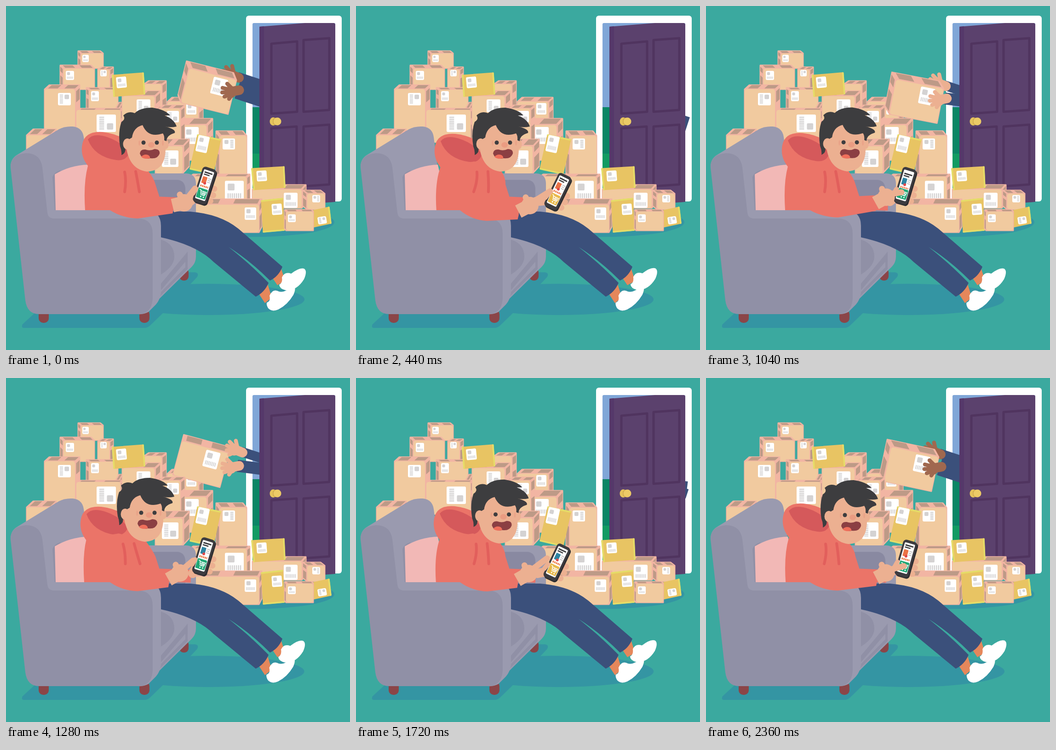
An HTML page for the animation above (2400 ms loop, 748x748 px).

```html
<!DOCTYPE html>
<html lang="en">
<head>
<meta charset="utf-8">
<title>Parcels</title>
<style>
html, body { margin: 0; width: 100%; height: 100%; overflow: hidden; background: #3ba99f; }
svg { display: block; width: 100vw; height: 100vh; }
</style>
</head>
<body>
<svg id="stage" viewBox="0 0 748 748" xmlns="http://www.w3.org/2000/svg"></svg>
<script>
const C = {
  front: '#f1ca9f', edge: '#f2b5a3', flap: '#bd9a87', grey: '#d4d2d2',
  env: '#e8c463', envEdge: '#e5dd68', door: '#5b416d', panel: '#50345f',
  sofa: '#9090a6', sofaLight: '#9a9aaf', sofaDeep: '#8989a1', wood: '#8b4548',
  shade: '#3495a3', jeans: '#3b507b', red: '#eb7468', redDeep: '#d5595b', cord: '#e25f5c',
  skin: '#ecb091', hair: '#3d3d3f', ankle: '#e5875b', pink: '#f2b8b6'
};

// ---------- drawing helpers ----------
const num = v => Math.round(v * 100) / 100;
const path = (d, fill, more = '') => `<path d="${d}" fill="${fill}" ${more}/>`;
const rect = (x, y, w, h, r, fill, more = '') =>
  `<rect x="${num(x)}" y="${num(y)}" width="${num(w)}" height="${num(h)}" rx="${r}" fill="${fill}" ${more}/>`;
const oval = (x, y, rx, ry, fill, more = '') =>
  `<ellipse cx="${x}" cy="${y}" rx="${rx}" ry="${ry}" fill="${fill}" ${more}/>`;
const line = (d, color, w, more = '') =>
  `<path d="${d}" fill="none" stroke="${color}" stroke-width="${w}" ${more}/>`;
const poly = pts => 'M' + pts.map(p => num(p[0]) + ',' + num(p[1])).join('L') + 'Z';
const round = 'stroke-linecap="round" stroke-linejoin="round"';

// kind 0: bars below, 1: bars left and square low, 2: bars left and square high, 3: bars right
function label(x, y, w, h, kind = 0) {
  const q = Math.min(w, h) * 0.36;
  const sx = kind === 1 || kind === 2 ? x + w * 0.86 - q : x + w * 0.15;
  const sy = kind === 1 ? y + h * 0.86 - q : y + h * 0.14;
  let d = '';
  for (let i = 0; i < 7; i++) {
    if (kind === 0) d += `M${num(x + w * (0.17 + i * 0.11))},${num(y + h * 0.62)}v${num(h * 0.24)}`;
    else d += `M${num(x + w * (kind === 3 ? 0.62 : 0.14))},${num(y + h * (0.16 + i * 0.11))}h${num(w * 0.25)}`;
  }
  return rect(x, y, w, h, 3, '#fff') + rect(sx, sy, q, q, 2, C.grey) + line(d, C.grey, num(w * 0.06));
}

// Front face at x, y; s is the signed side depth, d the lid depth.
function box(x, y, w, h, s, d, lab = '') {
  const top = (a, b) => [x + w * a + s * b, y - d * b];
  const sx = s > 0 ? x + w : x;
  const side = (c, b) => [sx + s * b, y + h * c - d * b];
  const hull = s > 0
    ? [[x, y], top(0, 1), top(1, 1), side(1, 1), [x + w, y + h], [x, y + h]]
    : [[x + w, y], top(1, 1), top(0, 1), side(1, 1), [x, y + h], [x + w, y + h]];
  const lid = (a, b) => poly([top(a, 0.2), top(b, 0.2), top(b, 1), top(a, 1)]);
  const flap = (a, b) => poly([side(a, 0.25), side(b, 0.25), side(b, 1), side(a, 1)]);
  let out = path(poly(hull), C.edge, `stroke="${C.edge}" stroke-width="3" stroke-linejoin="round"`);
  out += path(lid(0.08, 0.4) + lid(0.62, 0.97), C.flap);
  if (Math.abs(s) > 2) out += path(flap(0.06, 0.28) + flap(0.48, 0.97), C.flap);
  return out + rect(x, y, w, h, 5, C.front) + lab;
}

function envelope(pts, lab) {
  return path(poly(pts), C.env, `stroke="${C.env}" stroke-width="3" stroke-linejoin="round"`) + lab;
}
const strip = d => line(d, C.envEdge, 3.5, round);
const turn = (a, x, y, body) => `<g transform="rotate(${a} ${x} ${y})">${body}</g>`;

// ---------- scene ----------
const REST = [331, 259];
const parcelArt = s => box(0, 0, 105, 76, s, 14, label(56, 4, 32, 37));

function doorway() {
  return rect(522, 21, 208, 404, 6, '#fff') + rect(536, 37, 180, 388, 3, '#80a6d7') +
    rect(536, 220, 40, 101, 0, '#0a8665') + rect(536, 321, 40, 104, 0, '#129b62');
}
function door() {
  const panels = 'M577,82L633,77V230L577,234ZM647,74L703,70V226L647,230Z' +
    'M577,266L632,262V394L577,398ZM647,262L703,258V388L647,392Z';
  return path('M551,45L650,37H712Q716,37 716,41V426L551,438Z', C.door) +
    path('M551,45L561,44V437L551,438Z', '#55386a') +
    line(panels, C.panel, 5, 'stroke-linejoin="round"') +
    oval(581, 251, 7.5, 9, '#e6c35d') + oval(585, 251, 5, 8, '#cfa94c') + oval(590, 251, 8.5, 8.5, '#ecca66');
}

function backPile() {
  return box(163, 103, 48, 32, -6, 5, label(166, 106, 14, 16)) +
    box(125, 136, 67, 45, -7, 7, label(130, 141, 18, 20)) +
    box(200, 138, 25, 43, 8, 5, label(205, 139, 14, 14, 2)) +
    box(181, 182, 62, 46, -6, 4, label(185, 185, 17, 22)) +
    box(84, 181, 66, 110, 10, 9, label(113, 189, 28, 27, 2)) +
    box(45, 281, 50, 50, 14, 13) +
    box(238, 224, 14, 50, 8, 14) +
    box(153, 226, 96, 70, 4, 3, label(197, 236, 42, 38, 1)) +
    box(300, 170, 38, 75, 10, 7) +
    box(253, 196, 70, 70, 12, 11, label(284, 203, 30, 28, 1)) +
    box(351, 208, 67, 55, 10, 9, label(392, 211, 22, 25));
}
function frontPile() {
  return box(333, 223, 46, 85, 9, 7, label(350, 228, 26, 25, 1)) +
    box(325, 305, 59, 59, 14, 15, label(339, 314, 36, 36, 1)) +
    box(465, 282, 58, 92, -8, 10, label(471, 288, 27, 24, 3)) +
    `<g id="envLow">` + envelope([[417, 281], [466, 291], [450, 364], [401, 353]],
      strip('M417,281L466,291M401,354L450,365') + turn(12, 427, 300, label(415, 282, 25, 36))) + '</g>' +
    box(400, 371, 123, 64, 7, 5, label(476, 380, 41, 44)) +
    box(536, 399, 107, 40, 9, 10, label(604, 406, 30, 33)) +
    envelope([[535, 354], [604, 350], [606, 394], [539, 399]],
      strip('M535,354L539,399M604,350L606,394') + turn(-4, 556, 369, label(545, 358, 22, 23))) +
    box(400, 432, 150, 60, 6, 12, label(519, 438, 25, 27)) +
    box(655, 408, 38, 34, -9, 7, label(666, 411, 17, 16, 3)) +
    envelope([[669, 445], [702, 438], [706, 472], [669, 480]],
      strip('M702,438L706,472') + turn(-9, 687, 466, label(678, 458, 19, 16, 2))) +
    envelope([[556, 424], [601, 419], [605, 487], [560, 491]],
      strip('M556,424L601,419M560,491L605,487') + turn(-4, 589, 442, label(578, 430, 22, 24))) +
    box(609, 447, 59, 41, -3, 4, label(613, 453, 17, 17));
}

function farSofa() {
  return path('M40,700H300Q308,700 313,695L340,669L415,590Q422,579 408,579H120L62,668L36,692Q32,700 40,700Z', C.shade) +
    oval(440, 638, 209, 34, C.shade, 'id="manShade"') +
    rect(377, 570, 20, 27, 9, C.wood) + rect(71, 660, 22, 29, 10, C.wood) + rect(290, 660, 22, 29, 10, C.wood) +
    path('M290,364H393Q413,366 413,386V545Q413,558 404,567L328,642H290Z', C.sofaLight) +
    path('M300,378H374Q388,380 390,396V450H300Z', C.sofaDeep) +
    path('M330,506Q366,514 366,545Q366,568 330,588Z', C.sofa) +
    path('M330,612L395,534V572L330,636Z', C.sofa) + path('M337,618L390,556V568L337,622Z', C.sofaLight) +
    path('M10,352Q9,334 22,325L115,268Q128,261 145,262Q166,264 169,285L190,450H60Z', C.sofaLight) +
    path('M101,372Q104,362 118,357V446H106Z', C.sofa) +
    path('M106,366Q140,346 178,345L200,446H108Z', C.pink);
}
function nearSofa() {
  return path('M78,352L106,444H304Q337,446 337,478V625Q334,640 326,649L310,665Q300,671 288,670H110Z', C.sofaLight) +
    path('M10,352Q9,322 44,320Q74,320 79,350L90,450Q92,462 104,462H288Q319,463 319,496V636Q317,669 288,670H72Q46,670 42,640Z', C.sofa);
}
function legs() {
  return path('M598,570L607,598L590,607L580,592Z', C.ankle) + path('M569,605L578,634L563,646L550,626Z', C.ankle) +
    path('M600,590Q606,577 620,582Q638,568 648,571Q656,576 648,594Q632,620 608,618Q595,615 594,606Q602,602 600,590Z', '#fff', 'id="shoeFar"') +
    path('M573,630Q580,613 594,621Q606,624 625,608Q632,612 625,628Q612,650 592,660Q578,666 570,657Q566,650 567,645Q576,642 573,630Z', '#fff', 'id="shoeNear"') +
    path('M320,447H400Q465,452 505,484L601,567Q593,588 574,597Q530,553 484,524Q530,560 571,602Q562,623 543,632L452,557Q415,520 337,503L320,500Z', C.jeans);
}

function head() {
  return oval(348, 301, 5.5, 10, C.skin) +
    path('M260,290Q262,354 306,360Q346,359 347,312V262Q300,235 262,272Z', C.skin) +
    oval(290, 298, 2, 6, '#eaa489') + oval(341, 298, 2, 6, '#eaa489') +
    oval(316, 302, 7, 6, '#ea9c82') + oval(299, 297, 4.5, 4.5, C.hair) + oval(328, 297, 4.5, 4.5, C.hair) +
    path('M291,321Q292,311 303,312Q313,316 323,311Q335,311 334,321Q330,333 314,331Q296,335 291,321Z', '#8b3f43') +
    path('M294,328Q300,321 309,324Q314,327 313,331Q300,334 294,328Z', '#ef6f5b') +
    path('M251,324Q252,314 248,305Q243,275 251,252Q261,246 255,238Q266,227 280,233Q292,221 318,221Q346,225 357,238L345,238' +
      'Q366,246 371,262Q358,265 346,262Q370,268 367,276Q349,281 349,294L344,292Q345,282 341,277Q309,288 297,259Q277,264 274,286Q261,292 259,306Q262,320 251,324Z', C.hair) +
    oval(264, 300, 9.5, 12, C.skin);
}

function screenPage(color, spot) {
  return rect(-9, -30, 18, 3, 1, C.hair) + rect(-9, -25, 13, 2.5, 1, C.hair) +
    rect(-9, -19, 10, 15, 1.5, color) + oval(-1, -5, 3, 3, spot) +
    line('M3,-17h7M3,-13h6M3,-9h7', '#bbb', 1.6) +
    line('M-9,2h18', '#ef8354', 4, 'stroke-dasharray="3 1"');
}
function phone() {
  return rect(-14, -38, 31, 80, 7, '#2e2d30') + rect(-17, -40, 31, 80, 7, '#3d3c40') +
    rect(-13, -34, 23, 66, 2, '#fff') +
    `<g clip-path="url(#glass)"><g transform="translate(-1.5 0)"><g id="pageA">${screenPage('#ec7346', '#e0484a')}</g>` +
    `<g id="pageB">${screenPage('#2f85a2', '#e0484a')}</g></g></g>` +
    rect(-12, 7, 21, 22, 2, '#22a876', 'id="buy"') +
    line('M-9,11h3l3,10h8l2,-8h-12M-4,17h10M0,13v8M3,13v8', '#fff', 1.5) +
    oval(-2, 25, 1.5, 1.5, '#fff') + oval(4, 25, 1.5, 1.5, '#fff');
}
function man() {
  return path('', C.red, 'id="hood"') + path('', C.redDeep, 'id="hoodIn"') +
    line('', C.red, 28, 'id="farSleeve"') + path('', C.red, 'id="torso"') +
    line('', C.cord, 6, 'id="cords" ' + round) + `<g id="head">${head()}</g>` +
    line('', C.skin, 20, 'id="farPalm" ' + round) +
    `<g id="phone">${line('M0,2L21,0M2,14L23,14M2,28L21,28', C.skin, 13, round)}${phone()}` +
    `${line('M-20,24L-17,12', C.skin, 10, round)}</g>` +
    path('', C.red, 'id="sleeve"') + line('', C.skin, 30, 'id="wrist"') +
    `<circle id="palm" r="19" fill="${C.skin}"/>` + line('', C.skin, 13, 'id="fingers" ' + round);
}

const handArt = line('M4,0L-12,3', 'currentColor', 21, round) + oval(-14, 4, 12, 13, 'currentColor') +
  line('M-12,0L-32,-5M-12,4L-33,5M-12,8L-28,14M-12,10L-18,19M-10,-2L-22,-14', 'currentColor', 8.5, round);
const arm = id => `<g id="${id}">${line('', C.jeans, 26, `id="${id}Sleeve"`)}<g id="${id}Hand">${handArt}</g></g>`;

document.getElementById('stage').innerHTML =
  '<defs><clipPath id="glass"><rect x="-13" y="-34" width="23" height="40"/></clipPath></defs>' +
  rect(0, 0, 748, 748, 0, '#3ba99f') + oval(540, 470, 174, 32, C.shade) + doorway() + backPile() +
  `<g transform="translate(${REST})">${parcelArt(13)}</g>` +
  `<g id="mover">${arm('far')}<g id="parcel"></g>${arm('near')}</g>` + door() +
  '<g id="envTop">' + envelope([[232, 151], [298, 146], [301, 191], [235, 196]],
    strip('M232,151L235,196M298,146L301,191') + turn(-5, 251, 166, label(240, 154, 22, 24))) + '</g>' +
  frontPile() + farSofa() + legs() + nearSofa() + man();

// ---------- motion ----------
const LOOP = 2400, BEAT = 1200, STEP = 40;
// rows: [time, ...values]
const KEYS = {
  head: [[0, 0, 0], [80, -5, -4], [280, 0, -7], [440, 7, 0], [760, -6, -4], [1160, 3, 1]],
  hood: [[0, 0, 0], [80, -3, 6], [280, 0, 10], [440, 6, 4], [760, -4, 9], [1160, 2, -1]],
  phone: [[0, 433, 391, 18], [80, 431, 388, 17], [280, 435, 396, 19], [440, 440, 404, 26], [760, 429, 389, 20], [1160, 436, 393, 16]],
  wrist: [[0, 361, 434], [80, 352, 438], [280, 365, 438], [440, 352, 447], [760, 349, 409], [900, 362, 420], [1160, 369, 435]],
  palm: [[0, 387, 428], [80, 378, 424], [280, 390, 430], [440, 378, 434], [760, 373, 394], [900, 389, 406], [1160, 391, 424]],
  tip: [[0, 411, 397], [80, 407, 397], [280, 412, 398], [440, 422, 403], [760, 392, 354], [900, 429, 372], [1040, 425, 405], [1160, 430, 409]],
  shoe: [[0, 0], [80, -1], [280, -5], [440, -4], [760, -3], [1160, 0]],
  wob: [[0, 0], [440, 0], [760, 1], [1160, 0]]
};
// x, y, angle, side depth
const TOSS = [[640, 610, 330, -35, -12], [760, 492, 275, -27, -12], [880, 440, 195, -6, -12], [1000, 418, 164, 9, -12],
  [1120, 407, 157, 12, -12], [1160, 403, 150, 12, -12], [1200, 399, 136, 14, -10], [1280, 383, 137, 15, 0],
  [1400, 348, 164, 19, 6], [1480, 330, 204, 21, 10], [1560, ...REST, 0, 13]];
const NEAR = [[1160, 508, 193], [1200, 503, 183], [1280, 503, 191], [1400, 545, 208], [1500, 610, 224]];
const FAR = [[1160, 507, 164], [1200, 503, 154], [1280, 511, 160], [1400, 550, 190], [1500, 610, 216]];

// Cubic interpolation through the rows, wrapping when a period is given.
function sample(rows, t, period) {
  const n = rows.length;
  if (!period && t <= rows[0][0]) return rows[0].slice(1);
  if (!period && t >= rows[n - 1][0]) return rows[n - 1].slice(1);
  const at = i => {
    if (!period) return rows[Math.max(0, Math.min(n - 1, i))];
    const r = rows[(i + n) % n];
    return [r[0] + Math.floor(i / n) * period, ...r.slice(1)];
  };
  let i = 0;
  while (i < n - 1 && rows[i + 1][0] <= t) i++;
  const [a, b, c, d] = [at(i - 1), at(i), at(i + 1), at(i + 2)];
  const h = c[0] - b[0], u = (t - b[0]) / h;
  return b.slice(1).map((p, k) => {
    const j = k + 1;
    const m0 = (c[j] - a[j]) / (c[0] - a[0]) * h, m1 = (d[j] - b[j]) / (d[0] - b[0]) * h;
    const u2 = u * u, u3 = u2 * u;
    return (2 * u3 - 3 * u2 + 1) * p + (u3 - 2 * u2 + u) * m0 + (3 * u2 - 2 * u3) * c[j] + (u3 - u2) * m1;
  });
}

const el = id => document.getElementById(id);
const set = (id, name, v) => el(id).setAttribute(name, v);
const move = (id, x, y, a = 0) => set(id, 'transform', `translate(${num(x)} ${num(y)}) rotate(${num(a)})`);
const seg = (a, b) => `M${num(a[0])},${num(a[1])}L${num(b[0])},${num(b[1])}`;

function drawToss(t) {
  const shift = t - 600;
  const u = (shift + LOOP) % BEAT + 600;
  const pale = Math.floor(shift / BEAT) % 2 === 0;
  const [x, y, a, s] = sample(TOSS, u);
  const rad = a * Math.PI / 180, co = Math.cos(rad), si = Math.sin(rad);
  const onBox = (px, py) => [x + px * co - py * si, y + px * si + py * co];
  const near = u < 1160 ? onBox(112, 20) : sample(NEAR, u);
  const far = u < 1160 ? onBox(105, -8) : sample(FAR, u);
  el('parcel').innerHTML = u < 1600 ? parcelArt(s) : '';
  move('parcel', x, y, a);
  el('mover').style.color = pale ? C.skin : '#a0684f';
  el('mover').insertBefore(el('far'), u > 1220 ? el('near') : el('parcel'));
  move('nearHand', near[0], near[1]);
  move('farHand', far[0], far[1], 32);
  set('nearSleeve', 'd', seg(near, [near[0] + 110, near[1] + (pale ? 14 : 36)]));
  set('nearSleeve', 'stroke-width', pale ? 26 : 38);
  set('farSleeve'.replace('far', 'far'), 'd', '');
  el('far').firstChild.setAttribute('d', seg(far, [far[0] + 110, far[1] + 36]));
  el('far').firstChild.setAttribute('stroke-width', 21);
}

function drawScreen(t, p) {
  const q = (t + 300) % LOOP, r = Math.min(1, q % BEAT / 160);
  const k = r * r * (3 - 2 * r), now = q < BEAT ? 'pageA' : 'pageB';
  move(now, 0, 62 * (1 - k));
  move(now === 'pageA' ? 'pageB' : 'pageA', 0, -62 * k);
  set('buy', 'fill', p >= 400 && p < 540 ? '#e8b94c' : '#22a876');
}

function drawMan(p) {
  const get = name => sample(KEYS[name], p, BEAT);
  const [dx, dy] = get('head'), [hx, hy] = get('hood');
  const [px, py, pa] = get('phone'), w = get('wrist'), m = get('palm'), tip = get('tip');
  const left = 172 + dx * 0.4;

  move('head', dx, dy);
  set('hood', 'd', 'M184,354Q160,330 166,300Q172,271 210,274Q248,278 275,302L300,356Z');
  set('hoodIn', 'd', 'M178,290Q190,275 220,285Q250,295 268,318Q262,338 240,335Q192,328 178,290Z');
  move('hood', hx, hy);
  move('hoodIn', hx, hy);
  set('torso', 'd', `M${num(left)},444Q${num(left - 4)},385 ${num(178 + hx)},${num(348 + hy * 0.3)}` +
    `L${num(250 + dx)},338L${num(308 + dx)},${num(357 + dy)}Q${num(322 + dx * 0.6)},375 325,388L333,413Q336,440 318,452Q262,460 228,444Z`);
  const cord = (x, y, x2) => `M${num(x + dx * 0.7)},${y}Q${num(x + 4 + dx * 0.4)},380 ${num(x2 - dx * 0.3)},404`;
  set('cords', 'd', cord(258, 361, 258) + cord(282, 360, 290));

  move('phone', px, py, pa);
  const cuff = [396 - dx * 1.2, 431];
  set('cuffLine', 'd', seg([320, 428], cuff));
  set('farPalm', 'd', seg([cuff[0] + 4, cuff[1] - 6], [px - 14, py + 18]));

  const e = [285, 440 + (w[1] - 434) * 0.4];
  const len = Math.hypot(w[0] - e[0], w[1] - e[1]);
  const nx = -(w[1] - e[1]) / len, ny = (w[0] - e[0]) / len;
  const off = (c, r) => `${num(c[0] + nx * r)},${num(c[1] + ny * r)}`;
  set('sleeve', 'd', `M${off(e, -22)}L${off(w, -17)}Q${num(w[0] + 5)},${num(w[1])} ${off(w, 17)}L${off(e, 22)}` +
    `Q${num(e[0] - 32)},${num(e[1] + 21)} 226,444L240,420Z`);
  set('wrist', 'd', seg([w[0] + 1, w[1]], m));
  set('palm', 'cx', num(m[0]));
  set('palm', 'cy', num(m[1]));
  set('fingers', 'd', seg([m[0] + 4, m[1] - 6], tip) + seg([m[0] - 4, m[1] - 4], [m[0] - 9, m[1] - 18]));

  move('shoeFar', dx * 0.4, -dx * 0.1);
  move('shoeNear', get('shoe')[0] * 0.6, 0);
  set('manShade', 'rx', num(209 + get('shoe')[0] * 0.5));
  const wob = get('wob')[0];
  set('envTop', 'transform', `rotate(${num(-wob)} 235 196)`);
  set('envLow', 'transform', `rotate(${num(wob * 2)} 425 358)`);
}

// The thrower and the man each own a far sleeve; keep their ids apart.
document.querySelectorAll('#farSleeve')[1].id = 'cuffLine';

function draw(ms) {
  const t = Math.floor(ms % LOOP / STEP) * STEP, p = t % BEAT;
  drawToss(t);
  drawScreen(t, p);
  drawMan(p);
}
let start = null;
function tick(now) {
  if (start === null) start = now;
  draw(now - start);
  requestAnimationFrame(tick);
}
draw(0);
requestAnimationFrame(tick);
</script>
</body>
</html>
```
